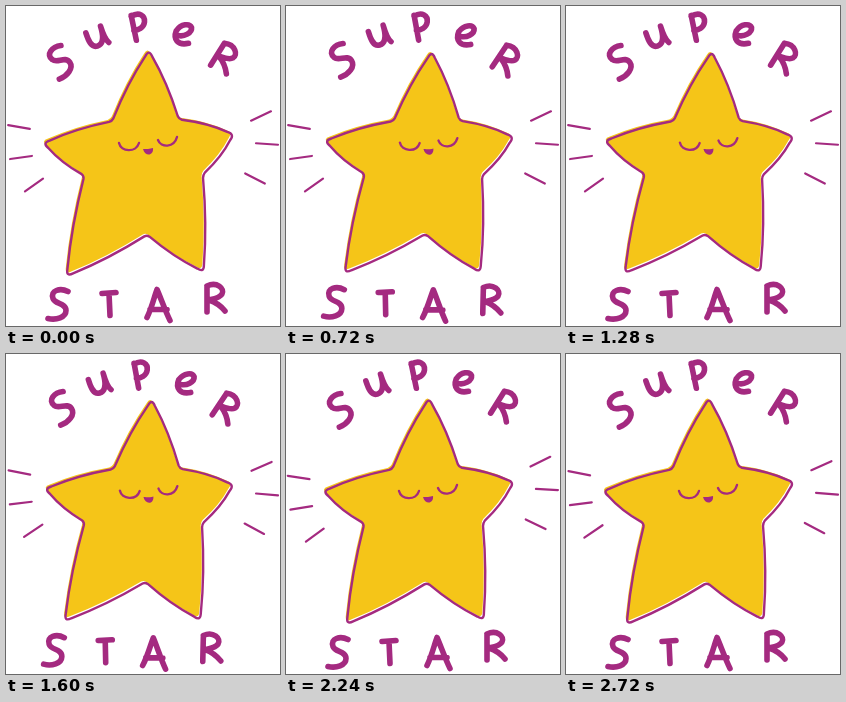
Recreate the animation shown at these times as an HTML page with a canvas. Size 274 by 320 pixels, loop 2840 ms.

```html
<!DOCTYPE html>
<html lang="en">
<head>
<meta charset="utf-8">
<title>Super star</title>
<style>
html, body { margin: 0; width: 100%; height: 100%; overflow: hidden; background: #fff; }
canvas { display: block; width: 100vw; height: 100vh; }
</style>
</head>
<body>
<canvas id="stage" role="img" aria-label="Super star"></canvas>
<script>
const W = 274, H = 320, LOOP = 2840, BEAT = 160;
const INK = '#a42a80', GOLD = '#f5c518';
const canvas = document.getElementById('stage');
const ctx = canvas.getContext('2d');
const dpr = window.devicePixelRatio || 1;
canvas.width = W * dpr;
canvas.height = H * dpr;

// Brush strokes of each letter, centred on the origin.
const glyphs = {
  S: 'M10 -13C2 -17 -8 -14 -5 -6C-3 0 8 -2 8 6C8 13 -2 16 -10 14',
  u: 'M-9 -7C-9 2 -8 9 -2 9C4 9 7 3 7 -9C7 -2 7 5 10 9',
  P: 'M-5 -12L-1 13M-5 -11C3 -16 9 -11 8 -5C7 1 1 3 -3 3',
  e: 'M-5 3C1 3 8 -3 6 -8C3 -12 -5 -9 -8 -1C-9 8 -3 13 7 8',
  R: 'M-9 -12L-9 13M-9 -13C1 -18 9 -10 6 -5C4 -1 -3 0 -7 1C-1 3 5 7 9 12',
  T: 'M-7 -11L7 -12M0 -11L1 11',
  A: 'M-11 13C-6 3 -4 -7 -1 -15C3 -6 7 6 12 16M-8 5L9 5'
};
const rad = deg => deg * Math.PI / 180;

// Runs draw with the origin moved to x, y and turned.
function at(x, y, turn, draw, size = 1) {
  ctx.save();
  ctx.translate(x, y);
  ctx.rotate(turn);
  ctx.scale(size, size);
  draw();
  ctx.restore();
}

// Turns a drawing about a fixed point.
const about = (x, y, turn, draw, size) =>
  at(x, y, turn, () => { ctx.translate(-x, -y); draw(); }, size);

function stroke(path, width) {
  ctx.lineWidth = width;
  ctx.stroke(path);
}

const letter = (c, x, y, turn) => at(x, y, turn, () => stroke(new Path2D(glyphs[c]), 5.6));

function drawWords() {
  const arc = [-45, -23.5, -3.5, 19.5, 43];
  [...'SuPeR'].forEach((c, i) => {
    const a = rad(arc[i]);
    letter(c, 138 + 119 * Math.sin(a), 140 - 119 * Math.cos(a), a * 0.75);
  });
  const line = [52, 103, 152, 210];
  [...'STAR'].forEach((c, i) => letter(c, line[i], c === 'R' ? 293 : 298.5, 0));
}

// Centre and slope of each ray.
const rays = [
  [13, 121, 10], [15, 151.5, -8], [28, 179, -35],
  [255, 110, -25], [261, 138, 4], [249, 172.5, 27]
];
function drawRays() {
  const ray = new Path2D('M-11 0L11 0');
  for (const [x, y, deg] of rays) at(x, y, rad(deg), () => stroke(ray, 2.2));
}

// Corners clockwise from the top: tips and notches alternate.
const corners = [
  [143, 43], [173, 113], [229, 128], [197, 169], [198, 267],
  [141, 229], [60, 271], [78, 170], [36, 137], [106, 115]
];

// Point a given distance from a towards b.
function towards([ax, ay], [bx, by], dist) {
  const k = dist / Math.hypot(bx - ax, by - ay);
  return [ax + (bx - ax) * k, ay + (by - ay) * k];
}

// Edges swell outwards a little and corners are rounded, tips most.
function makeStar(bulge) {
  const path = new Path2D(), n = corners.length;
  const cut = i => i % 2 ? 3 : 8;
  path.moveTo(...towards(corners[0], corners[1], cut(0)));
  for (let i = 0; i < n; i++) {
    const a = corners[i], b = corners[(i + 1) % n], c = corners[(i + 2) % n];
    const dx = b[0] - a[0], dy = b[1] - a[1], len = Math.hypot(dx, dy);
    path.quadraticCurveTo(
      (a[0] + b[0]) / 2 + dy / len * bulge, (a[1] + b[1]) / 2 - dx / len * bulge,
      ...towards(b, a, cut(i + 1)));
    path.quadraticCurveTo(...b, ...towards(b, c, cut(i + 1)));
  }
  path.closePath();
  return path;
}
const star = makeStar(3.5);
const eyes = new Path2D('M113 137C115 146 130 147 133 137M152 134C155 142 168 142 171 131');
const mouth = new Path2D('M137 143C140 143 144 143 147 142C148 150 139 151 137 143Z');

function drawStar() {
  ctx.fillStyle = GOLD;
  at(-1.5, -2, 0, () => ctx.fill(star));
  stroke(star, 2.4);
  stroke(eyes, 2.4);
  ctx.fillStyle = INK;
  ctx.fill(mouth);
}

// The star hops between calm, left and right; a left lean also swells.
const lean = { c: 0, L: 1, r: -0.5 };
const hops = 'cccLcrrcrcrrLccLccc';

function frame(now) {
  const t = now % LOOP;
  const beat = Math.floor(t / BEAT);
  const sway = lean[hops[Math.floor(t / BEAT + 0.5)]];
  ctx.setTransform(dpr, 0, 0, dpr, 0, 0);
  ctx.fillStyle = '#fff';
  ctx.fillRect(0, 0, W, H);
  ctx.strokeStyle = INK;
  ctx.lineCap = ctx.lineJoin = 'round';
  about(140, 160, -0.05 * sway, drawStar, 1 + 0.022 * sway);
  about(137, 140, 0.02 * Math.sin(beat * Math.PI / 4), drawRays);
  about(137, 130, (beat + 3) % 6 < 2 ? 0.024 : 0, drawWords);
}

const begin = performance.now();
function tick() {
  frame(performance.now() - begin);
  requestAnimationFrame(tick);
}
tick();
</script>
</body>
</html>
```
